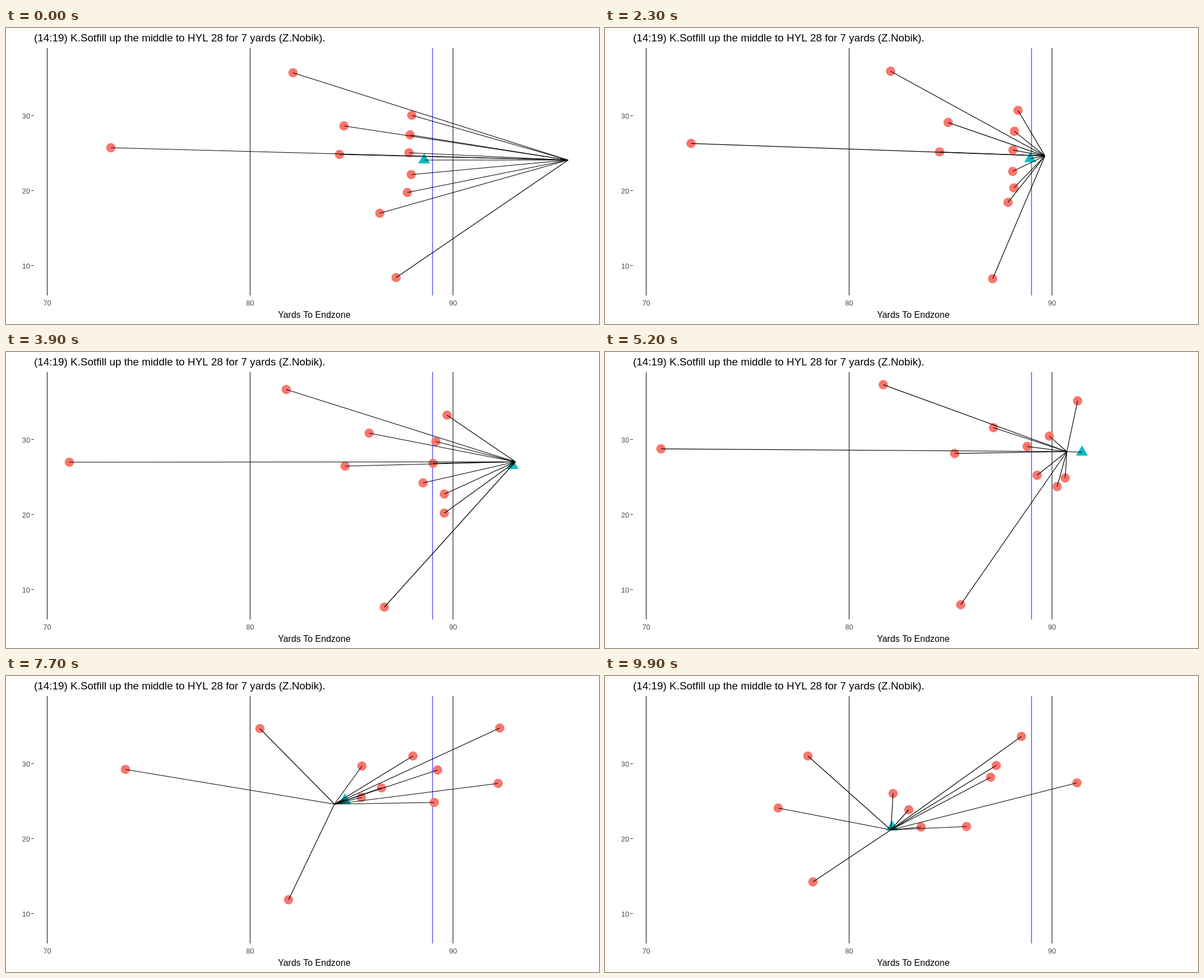
These frames come from a looping animation (1058 by 529 pixels, 10 s). An HTML page with a canvas:

```html
<!DOCTYPE html>
<html lang="en">
<head>
<meta charset="utf-8">
<title>Run play</title>
<style>
  html, body { margin: 0; width: 100%; height: 100%; overflow: hidden; background: #fff; }
  canvas { display: block; }
</style>
</head>
<body>
<canvas id="field" width="1058" height="529"></canvas>
<script>
const ctx = document.getElementById('field').getContext('2d');
const LOOP = 10000, STEP = 100, SNAP = 1900, BALL_LAG = 270;
const TAU = Math.PI * 2;

// Eased start (u ** power) to the second point, then a smooth spline through the rest.
function path(times, points, power) {
  const last = times.length - 1;
  const slope = (i, c) => (points[i + 1][c] - points[i][c]) / (times[i + 1] - times[i]);

  function tangent(i, c) {
    if (i === 1) return power * slope(0, c);
    if (i === last) return 2 * slope(i - 1, c) - tangent(i - 1, c);
    const a = times[i] - times[i - 1], b = times[i + 1] - times[i];
    return (slope(i - 1, c) * b + slope(i, c) * a) / (a + b);
  }

  return t => {
    let i = 0;
    while (i < last - 1 && t >= times[i + 1]) i++;
    const h = times[i + 1] - times[i];
    const u = Math.max(0, (t - times[i]) / h), v = 1 - u;
    return [0, 1].map(c => {
      const p = points[i][c], q = points[i + 1][c];
      if (i === 0) return p + (q - p) * u ** power;
      return p * v * v * (1 + 2 * u) + q * u * u * (3 - 2 * u) +
        h * u * v * (tangent(i, c) * v - tangent(i + 1, c) * u);
    });
  };
}

// Most defenders wait for the snap (power 3); two are already on the move.
const defender = (points, power = 3) => path([0, 3900, 6200, 7700, 9900], points, power);
const defenders = [
  defender([[512, 80], [500, 67], [489, 63], [453, 94], [362, 143]]),
  defender([[724, 156], [787, 113], [871, 83], [881, 93], [743, 108]]),
  defender([[721, 191], [767, 160], [793, 156], [770, 168], [688, 181]]),
  defender([[603, 175], [648, 145], [700, 142], [635, 161], [514, 210]]),
  defender([[187, 214], [113, 197], [123, 158], [213, 167], [309, 236]], 1.5),
  defender([[595, 226], [605, 204], [636, 179], [634, 217], [564, 270]]),
  defender([[719, 223], [762, 199], [730, 150], [726, 143], [698, 160]]),
  defender([[723, 262], [744, 234], [764, 215], [670, 200], [542, 239]]),
  defender([[716, 294], [782, 254], [818, 217], [764, 226], [645, 269]]),
  defender([[667, 331], [782, 288], [821, 205], [878, 192], [842, 191]], 1.5),
  defender([[696, 446], [675, 456], [588, 436], [504, 400], [371, 368]]),
];

const runner = path(
  [SNAP, 3300, 4200, 5200, 6200, 7700, 9900],
  [[746, 236], [882, 210], [905, 190], [824, 178], [714, 190], [586, 229], [510, 275]], 1);
const carrier = t => t < SNAP ? [1003, 236] : runner(t);
const ball = t => runner(t - BALL_LAG);

function line(x1, y1, x2, y2, color = '#000') {
  ctx.strokeStyle = color;
  ctx.beginPath();
  ctx.moveTo(x1, y1);
  ctx.lineTo(x2, y2);
  ctx.stroke();
}

function text(str, x, y, size, align, color = '#000') {
  ctx.font = `${size}px "Liberation Sans", Arial, sans-serif`;
  ctx.textAlign = align;
  ctx.fillStyle = color;
  ctx.fillText(str, x, y);
}

function drawAxes() {
  ctx.lineWidth = 1;
  text('(14:19) K.Sotfill up the middle to HYL 28 for 7 yards (Z.Nobik).', 50, 24, 18.9, 'left');
  text('Yards To Endzone', 550, 518, 16, 'center');
  for (const yard of [70, 80, 90]) {
    const x = 73.5 + (yard - 70) * 36.2;
    line(x, 36, x, 478);
    text(yard, x, 496, 12.8, 'center', '#4d4d4d');
  }
  for (const width of [10, 20, 30]) {
    const y = Math.round(424 - (width - 10) * 13.4) + 0.5;
    line(45, y, 50, y, '#333');
    text(width, 43, y + 5, 12.8, 'right', '#4d4d4d');
  }
  line(761, 36, 761, 478, '#00f');
}

function draw(t) {
  ctx.fillStyle = '#fff';
  ctx.fillRect(0, 0, 1058, 529);
  drawAxes();

  const spots = defenders.map(d => d(t));
  const [bx, by] = ball(t), [cx, cy] = carrier(t);

  ctx.fillStyle = '#f8766d';
  for (const [x, y] of spots) {
    ctx.beginPath();
    ctx.arc(x, y, 8.3, 0, TAU);
    ctx.fill();
  }

  ctx.fillStyle = '#00bfc4';
  ctx.beginPath();
  ctx.moveTo(bx, by - 12.2);
  ctx.lineTo(bx + 10.6, by + 6.1);
  ctx.lineTo(bx - 10.6, by + 6.1);
  ctx.fill();

  ctx.lineWidth = 1.2;
  for (const [x, y] of [...spots, [bx, by]]) line(x, y, cx, cy);
}

function tick() {
  draw(Math.floor(performance.now() % LOOP / STEP) * STEP);
  requestAnimationFrame(tick);
}
tick();
</script>
</body>
</html>
```
